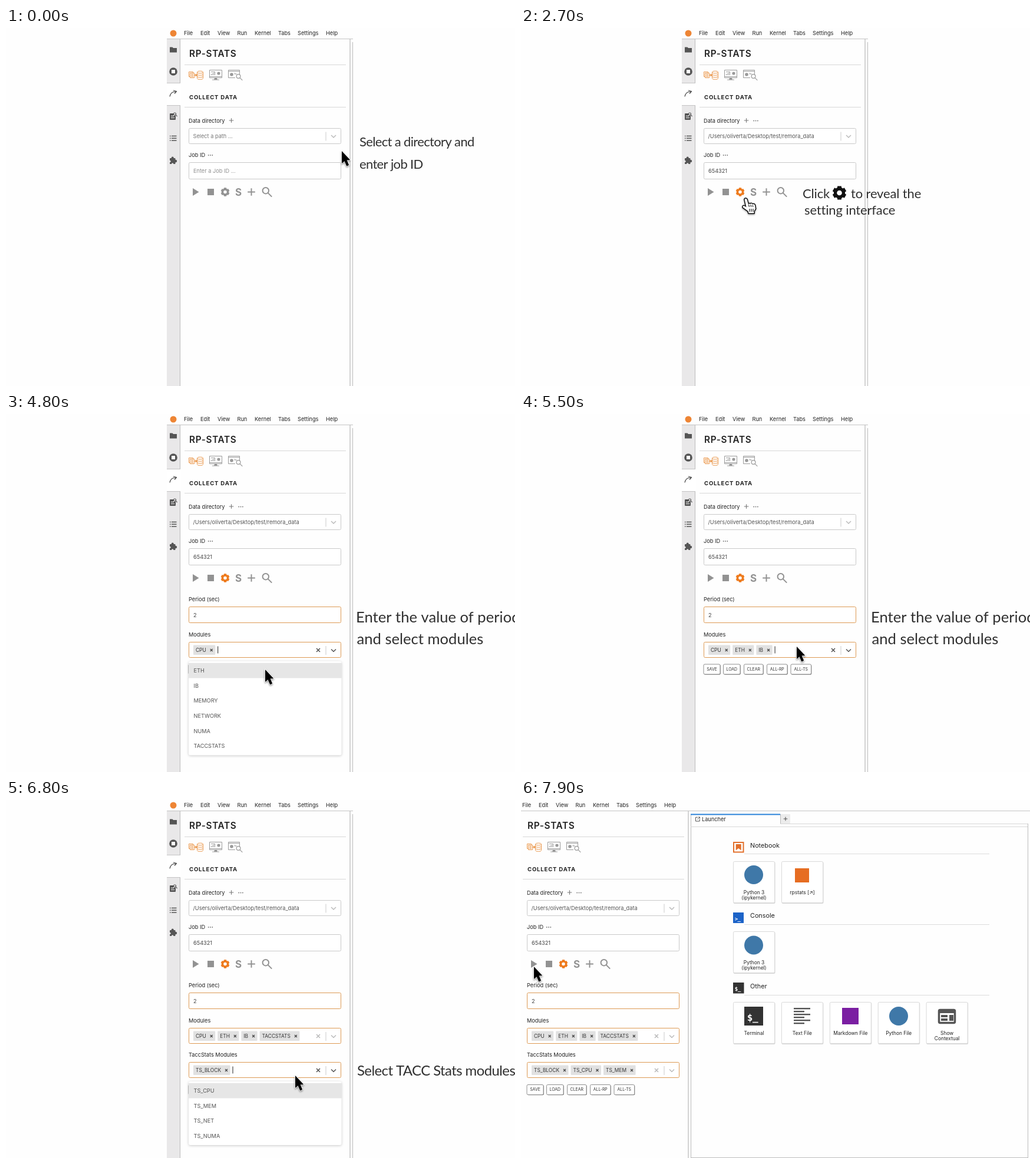
These frames come from a looping animation (864x608 px, 8000 ms). An HTML page with a canvas:

```html
<!DOCTYPE html>
<html lang="en">
<head>
<meta charset="utf-8">
<title>Collect data walkthrough</title>
<style>
html, body { margin: 0; width: 100%; height: 100%; overflow: hidden; background: #fefefe; }
canvas { display: block; width: 100vw; height: 100vh; }
</style>
</head>
<body>
<canvas id="stage" width="864" height="608"></canvas>
<script>
const ctx = document.getElementById('stage').getContext('2d');
const LOOP = 8000, CUT = 7700, STEP = 100;
const UI = 'Inter, "Liberation Sans", sans-serif';
const CAPTION = 'Lato, "Open Sans", sans-serif';
const INK = '#333', GREY = '#929292', LINE = '#c9c9c9', ORANGE = '#ee7a1c', FIELD = '#dd9a54';

// time, x, y, pointer kind from that time on
const MOVES = [
  [0, 570, 209, 'arrow'], [200, 570, 209, 'arrow'], [400, 505, 180, 'arrow'],
  [600, 490, 221, 'arrow'], [800, 497, 246, 'beam'], [900, 498, 254, 'beam'],
  [2000, 498, 254, 'beam'], [2200, 450, 270, 'arrow'], [2500, 381, 290, 'hand'],
  [2800, 381, 290, 'hand'], [3000, 412, 325, 'arrow'], [3200, 430, 343, 'beam'],
  [3700, 430, 343, 'beam'], [3800, 415, 362, 'arrow'], [3900, 415, 362, 'arrow'],
  [4200, 408, 402, 'arrow'], [4300, 408, 402, 'arrow'], [4400, 412, 434, 'arrow'],
  [4500, 412, 434, 'arrow'], [4700, 450, 402, 'arrow'], [4800, 440, 434, 'arrow'],
  [4900, 440, 434, 'arrow'], [5100, 455, 402, 'arrow'], [5200, 450, 434, 'arrow'],
  [5300, 450, 434, 'arrow'], [5500, 468, 395, 'arrow'], [5600, 468, 395, 'arrow'],
  [5700, 450, 511, 'arrow'], [5800, 450, 511, 'arrow'], [6200, 480, 462, 'arrow'],
  [6400, 470, 493, 'arrow'], [6500, 470, 493, 'arrow'], [6700, 491, 468, 'arrow'],
  [6800, 491, 468, 'arrow'], [6900, 485, 493, 'arrow'], [7000, 485, 493, 'arrow'],
  [7200, 495, 468, 'arrow'], [7300, 480, 493, 'arrow'], [7400, 480, 493, 'arrow'],
  [7900, 322, 283, 'arrow']
];

// options, picks [time, name], open spans, focus span
const MODULES = {
  y: 388, options: ['CPU', 'ETH', 'IB', 'MEMORY', 'NETWORK', 'NUMA', 'TACCSTATS'],
  picks: [[4500, 'CPU'], [4900, 'ETH'], [5300, 'IB'], [5800, 'TACCSTATS']],
  open: [[4300, 4500], [4700, 4900], [5100, 5300], [5600, 5800]], focus: [4300, 6300]
};
const TACC = {
  y: 446, options: ['BLOCK', 'CPU', 'MEM', 'NET', 'NUMA'].map(s => 'TS_' + s),
  picks: [[6500, 'TS_BLOCK'], [7000, 'TS_CPU'], [7400, 'TS_MEM']],
  open: [[6300, 6500], [6700, 7000], [7200, 7400]], focus: [6300, 7700]
};

const within = (t, [a, b]) => t >= a && t < b;

function text(s, x, y, size = 9.2, color = INK, o = {}) {
  ctx.font = `${o.weight || 400} ${size}px ${o.family || UI}`;
  ctx.letterSpacing = (o.gap || 0) + 'px';
  ctx.textAlign = o.align || 'left';
  ctx.fillStyle = color;
  ctx.fillText(s, x, y + size * 0.36);
  return ctx.measureText(s).width;
}

function rect(x, y, w, h, fill, stroke, r = 0, lw = 1) {
  ctx.beginPath();
  ctx.roundRect(x, y, w, h, r);
  if (fill) { ctx.fillStyle = fill; ctx.fill(); }
  if (stroke) { ctx.strokeStyle = stroke; ctx.lineWidth = lw; ctx.stroke(); }
}

function disc(x, y, r, fill) {
  ctx.beginPath();
  ctx.arc(x, y, r, 0, 7);
  ctx.fillStyle = fill;
  ctx.fill();
}

// SVG path drawn relative to a point
function path(d, x, y, fill, stroke, lw = 1) {
  const p = new Path2D(d);
  ctx.save();
  ctx.translate(x, y);
  ctx.lineJoin = 'round';
  if (stroke) { ctx.strokeStyle = stroke; ctx.lineWidth = lw; ctx.stroke(p); }
  if (fill) { ctx.fillStyle = fill; ctx.fill(p); }
  ctx.restore();
}

const hline = (x1, x2, y, c = '#d8d8d8') => rect(x1, y, x2 - x1, 1, c);
const vline = (x, y1, y2, c = '#bbb') => rect(x, y1, 1, y2 - y1, c);
const cross = (x, y, r, c, lw) => path(`M${-r} ${-r}L${r} ${r}M${r} ${-r}L${-r} ${r}`, x, y, null, c, lw);
const plus = (x, y, r, c, lw) => path(`M${-r} 0H${r}M0 ${-r}V${r}`, x, y, null, c, lw);

function dots(x, y) {
  for (let i = -1; i < 2; i++) disc(x + i * 3.3, y, 0.9, '#777');
}

function lens(x, y, r, c, lw) {
  ctx.beginPath();
  ctx.arc(x, y, r, 0, 7);
  ctx.moveTo(x + r * 0.7, y + r * 0.7);
  ctx.lineTo(x + r * 2, y + r * 2);
  ctx.strokeStyle = c;
  ctx.lineWidth = lw;
  ctx.stroke();
}

function gear(x, y, r, c) {
  ctx.beginPath();
  for (let i = 0; i < 6; i++) {
    const a = i * Math.PI / 3 + Math.PI / 2;
    for (const [da, k] of [[-0.38, 0.8], [-0.28, 1], [0.28, 1], [0.38, 0.8]])
      ctx.lineTo(x + Math.cos(a + da) * r * k, y + Math.sin(a + da) * r * k);
  }
  ctx.closePath();
  ctx.moveTo(x + r * 0.36, y);
  ctx.arc(x, y, r * 0.36, 0, Math.PI * 2);
  ctx.fillStyle = c;
  ctx.fill('evenodd');
}

function menuBar() {
  disc(284, 9, 5.5, '#ee8534');
  const items = [['File', 302], ['Edit', 330], ['View', 359], ['Run', 392.5], ['Kernel', 422],
    ['Tabs', 462], ['Settings', 495], ['Help', 543]];
  for (const [s, x] of items) text(s, x, 9, 9.2, '#222');
}

function sideBar() {
  rect(273, 19, 23, 589, '#e9e8e9');
  vline(295, 19, 608);
  rect(273, 94, 24, 37, '#fff');
  hline(273, 296, 93, '#c4c4c4');
  hline(273, 296, 131, '#c4c4c4');
  const c = '#555';
  path('M-6 -4.5H-1.5L0 -3H6V4.5H-6Z', 284, 37, c);
  disc(284, 74, 6.8, c);
  rect(281, 71, 6, 6, '#fff');
  path('M-6 5.5C-5 0 -1 -3 4 -3M0 -5L5.5 -3.5L2 .5', 284, 111, null, '#444', 1.2);
  rect(278, 145, 10, 11, c, null, 1);
  hline(280, 285, 149, '#fff');
  hline(280, 286, 152, '#fff');
  rect(284, 142, 6, 7, '#e9e8e9');
  lens(286.5, 146, 2, c, 1.2);
  for (let i = -1; i < 2; i++) {
    rect(278, 186.5 + i * 3.8, 1.6, 1.5, c);
    rect(281, 186.5 + i * 3.8, 8.5, 1.5, c);
  }
  rect(278, 221, 9.5, 10, c, null, 1);
  disc(282.7, 220.5, 2, c);
  disc(288, 226, 2.2, c);
  disc(278, 226.5, 1.7, '#e9e8e9');
  disc(282.7, 231, 1.7, '#e9e8e9');
}

function viewIcons() {
  const o = '#eb9a50';
  rect(310.5, 74.5, 7, 8, '#fff', o);
  rect(312.5, 76.5, 7, 8, '#fff', o);
  for (let i = 0; i < 3; i++) hline(314, 318, 78 + i * 2, o);
  path('M0 0H4M2 -2L4.5 0L2 2', 319.5, 80, null, o, 1.3);
  for (let i = 0; i < 4; i++) {
    ctx.beginPath();
    ctx.ellipse(329.5, 75 + i * 3.5, 5, 1.9, 0, 0, i ? Math.PI : 7);
    ctx.strokeStyle = o;
    ctx.lineWidth = 1;
    ctx.stroke();
  }
  path('M-5 0V10.5M5 0V10.5', 329.5, 75, null, o);

  const g = '#9a9a9a';
  rect(345.5, 71.5, 21, 13, '#fff', g);
  hline(346, 366, 82, g);
  path('M-2 0H2L3 3H-3Z', 356, 85, g);
  hline(350, 362, 87.5, g);
  for (let i = 0; i < 4; i++) vline(348 + i * 2, 80 - (i * 5 % 4) - 2, 80, g);
  hline(348, 355, 74, g);
  disc(361, 77, 2.6, g);

  rect(377.5, 71.5, 19, 13, '#fff', g);
  hline(378, 396, 73, g);
  disc(383, 79, 2.8, g);
  vline(388, 76, 79, g);
  vline(390, 77, 79, g);
  rect(389, 79, 9, 8, '#fff');
  lens(394.5, 82, 3.4, g, 1.2);
}

function box(y, h, border) {
  rect(310.5, y - 0.5, 258, h, '#fff', border, 2);
}

function chevron(y, lit) {
  vline(542.5, y + 6, y + 21, '#ccc');
  path('M-4 -2L0 2L4 -2', 556, y + 13.5, null, lit ? '#555' : '#bbb', 1.5);
}

function caret(x, y) {
  vline(x, y - 6, y + 6, '#222');
}

function tags(names, y) {
  let x = 318;
  for (const s of names) {
    ctx.font = `400 8.4px ${UI}`;
    ctx.letterSpacing = '0px';
    const w = ctx.measureText(s).width + 19.5;
    rect(x, y + 4.5, w, 16.5, '#e1e1e1', null, 1);
    text(s, x + 4, y + 12.5, 8.4, '#333');
    cross(x + w - 6.5, y + 13, 2, '#444', 1.2);
    x += w + 4;
  }
  return x;
}

function optionMenu(list, top, cursorY) {
  const row = 25.7, h = Math.min(list.length * row + 5.4, 586 - top);
  ctx.save();
  ctx.shadowColor = 'rgba(0,0,0,.22)';
  ctx.shadowBlur = 4;
  ctx.shadowOffsetY = 1;
  rect(310, top, 259.5, h, '#fff', null, 3);
  ctx.restore();
  ctx.save();
  ctx.beginPath();
  ctx.rect(310, top, 260, h);
  ctx.clip();
  const over = Math.floor((cursorY - top - 2.7) / row);
  const hot = over > 0 && over < list.length ? over : 0;
  list.forEach((s, i) => {
    const y = top + 2.7 + i * row;
    if (i === hot) rect(310, y, 260, row, '#e6e6e6');
    text(s, 318.5, y + row / 2, 9.2, '#555');
  });
  ctx.restore();
}

function multiSelect(m, t) {
  const focus = within(t, m.focus);
  const chosen = m.picks.filter(p => t >= p[0]).map(p => p[1]);
  box(m.y, 26, FIELD);
  if (chosen.length) {
    const x = tags(chosen, m.y);
    if (focus) caret(x, m.y + 12.5);
    cross(530, m.y + 13, 3, focus ? '#555' : '#bbb', 1.6);
  } else {
    text('Select...', 318, m.y + 12.5, 9.2, '#8a8a8a');
    if (focus) caret(317, m.y + 12.5);
  }
  chevron(m.y, focus);
}

function drop(m, t, cy) {
  if (!m.open.some(s => within(t, s))) return;
  const chosen = m.picks.filter(p => t >= p[0]).map(p => p[1]);
  optionMenu(m.options.filter(s => !chosen.includes(s)), m.y + 32, cy);
}

function buttons(y) {
  const list = [['SAVE', 310, 28], ['LOAD', 343.5, 28.5], ['CLEAR', 378.5, 32.5],
    ['ALL-RP', 417.5, 34.5], ['ALL-TS', 458, 34.5]];
  for (const [s, x, w] of list) {
    rect(x + 0.8, y - 7.7, w, 17, '#777', null, 2);
    rect(x, y - 8.5, w, 17, '#fff', '#8f8f8f', 2);
    text(s, x + w / 2, y, 6.9, '#333', { align: 'center' });
  }
}

function settings(t) {
  if (t < 2800) return;
  ctx.save();
  if (t < 2900) {
    ctx.beginPath();
    ctx.rect(296, 300, 288, 102);
    ctx.clip();
  }
  text('Period (sec)', 310, 315, 9.2, '#222');
  box(328, 27, FIELD);
  if (t >= 3400) text('2', 318, 341.5, 9.2, '#444');
  if (within(t, [3200, 3800])) caret(t < 3400 ? 318 : 324.5, 341.5);
  text('Modules', 310, 374.5, 9.2, '#222');
  multiSelect(MODULES, t);
  const tacc = t >= 5800;
  if (tacc) {
    text('TaccStats Modules', 310, 432.5, 9.2, '#222');
    multiSelect(TACC, t);
  }
  buttons(tacc ? 492 : 433.5);
  ctx.restore();
}

function form(t, cy) {
  text('RP-STATS', 311, 43.5, 15.3, '#222', { weight: 600, gap: 0.7 });
  hline(303, 577, 62);
  viewIcons();
  text('COLLECT DATA', 311, 117.5, 9.6, '#222', { weight: 700, gap: 0.8 });
  hline(303, 577, 134);

  const picked = t >= 700;
  text('Data directory', 310, 157.5, 9.2, '#222');
  plus(382.5, 157, 3.8, '#777', 1.1);
  if (picked) dots(398.5, 157.5);
  box(171, 26, LINE);
  const dir = '/Users/oliverta/Desktop/test/remora_data';
  text(picked ? dir : 'Select a path ...', 317.5, 183.5, 9.2, picked ? '#555' : '#777');
  chevron(170.5, within(t, [400, 700]));

  text('Job ID', 310, 216, 9.2, '#222');
  dots(347, 216);
  const focus = within(t, [800, 2100]);
  box(229, 28, focus ? '#5a96da' : LINE);
  const typed = '654321'.slice(0, Math.max(0, Math.floor((t - 1000) / 120)));
  const w = typed ? text(typed, 318, 242.5, 9.2, '#444') : 0;
  if (!typed) text('Enter a Job ID ...', 318, 242.5, 9.2, '#8f8f8f');
  if (focus) caret(318 + w, 242.5);

  path('M-5 -6.5L5.5 0L-5 6.5Z', 322, 278.5, GREY);
  rect(342, 273, 11, 11, GREY);
  gear(372, 278.5, 7.6, t >= 2500 ? ORANGE : GREY);
  text('S', 394.5, 278.5, 17, GREY, { weight: 700, align: 'center' });
  plus(416.5, 278.5, 6.3, GREY, 2);
  lens(440.8, 276.2, 5.2, GREY, 2);

  settings(t);
  if (within(t, [400, 700])) optionMenu([dir], 203, cy);
  drop(MODULES, t, cy);
  drop(TACC, t, cy);
}

function card(x, y, lines) {
  rect(x + 0.5, y + 1, 71, 71, '#d6d6d6', null, 2);
  rect(x + 0.5, y + 0.5, 70, 70, '#fff', '#dadada', 2);
  lines.forEach((s, i) => text(s, x + 35.5, y + 53 + i * 9.3, 8.4, '#222', { align: 'center' }));
}

function prompt(x, y, size, fill, s) {
  rect(x, y, size, size, fill);
  text(s, x + size * 0.15, y + size * 0.57, size * 0.5, '#fff', { weight: 700, family: '"DejaVu Sans Mono", monospace', gap: -0.5 });
}

function launcher() {
  vline(288, 24, 608);
  rect(288, 23.5, 152, 2, '#2b83da');
  vline(440, 24, 41);
  rect(441, 24, 16, 16, '#ececec');
  hline(440, 861, 40);
  hline(288, 861, 45);
  vline(860, 40, 608);
  hline(288, 861, 607, '#bbb');
  path('M0 -3.2H-3.5V3.5H3.2V0M1 -3.5H3.5V-1M3.5 -3.5L-.5 .5', 300, 32.5, null, '#555', 1);
  text('Launcher', 307, 32.5, 9.2, '#222');
  plus(449, 32, 3.3, '#555', 1.1);

  ['Notebook', 'Console', 'Other'].forEach((s, i) => {
    text(s, 389, 77 + i * 119.5, 10.8, '#222');
    hline(379, 795, 91 + i * 120, '#dcdcdc');
  });
  rect(361, 72, 16.5, 16.5, '#fff', '#e2702c', 0, 2);
  path('M-4.5 -5H4.5V5.5L0 2L-4.5 5.5Z', 369.2, 80, '#e2702c');
  prompt(360, 191, 18, '#1c63c8', '>_');
  prompt(360, 310, 18.5, '#333', '$_');

  const py = ['Python 3', '(ipykernel)'], blue = '#3f78a8';
  card(360, 104, py);
  disc(395, 127, 16, blue);
  card(442, 104, ['rpstats [↗]']);
  rect(465, 116, 24, 24, '#e66d22');
  card(360, 223, py);
  disc(395, 246.5, 16, blue);
  [['Terminal'], ['Text File'], ['Markdown File'], ['Python File'], ['Show', 'Contextual']]
    .forEach((s, i) => card(360 + i * 81.9, 343, s));
  prompt(379, 351, 32, '#333', '$_');
  for (let i = 0; i < 6; i++) rect(463, 353 + i * 5, i % 2 ? 18 : 28, 2.4, '#555');
  rect(545, 353, 28, 28, '#7b1fa2');
  disc(641, 367, 16, blue);
  rect(709.5, 356.5, 27, 22, '#fff', '#555', 2, 3.5);
  rect(709, 356, 28, 6, '#555');
  rect(713, 365, 11, 4, '#555');
  rect(713, 371, 11, 4, '#555');
  rect(727, 365, 7, 10, '#555');
}

function caption(t) {
  const put = (s, x, y, size, gap = 0) => text(s, x, y, size, '#303030', { family: CAPTION, gap });
  if (t < 2000) {
    put('Select a directory and', 600, 193, 22, -0.65);
    put('enter job ID', 600, 231, 22, -0.65);
  } else if (within(t, [2300, 3800])) {
    put('Click', 478, 281, 22, -0.15);
    gear(540.5, 280, 12, '#111');
    put('to reveal the', 560, 281, 22, -0.15);
    put('setting interface', 481, 309.5, 22, -0.15);
  } else if (within(t, [4000, 5700])) {
    put('Enter the value of period', 594, 345, 25.6);
    put('and select modules', 595.5, 382, 25.6);
  } else if (within(t, [6000, CUT])) {
    put('Select TACC Stats modules', 596, 459, 24, -0.6);
  }
}

function pointerAt(t) {
  let i = MOVES.length - 1;
  while (MOVES[i][0] > t) i--;
  const [t0, x, y, kind] = MOVES[i], next = MOVES[i + 1];
  if (!next) return { x, y, kind };
  const k = (t - t0) / (next[0] - t0), e = k * k * (3 - 2 * k);
  return { x: x + (next[1] - x) * e, y: y + (next[2] - y) * e, kind };
}

function pointer({ x, y, kind }) {
  if (kind === 'beam') {
    const d = 'M-5 -12Q0 -12 0 -8V8Q0 12 -5 12M5 -12Q0 -12 0 -8M0 8Q0 12 5 12M-3 2H3';
    path(d, x, y, null, '#fff', 3.2);
    path(d, x, y, null, '#111', 1.7);
    return;
  }
  ctx.save();
  ctx.shadowColor = 'rgba(0,0,0,.3)';
  ctx.shadowBlur = 3;
  ctx.shadowOffsetY = 1.5;
  if (kind === 'hand')
    path('M-1.5 1Q0 -2 2.5 1L5 10Q6 7 8.5 9Q10 7 12 9.5Q15 8 16 11L17 17L14.5 21V24.5H5.5L4.5 21L-4.5 14.5Q-5 11 -1 12.5L1.5 14.5Z', x, y, '#fff', '#111', 3);
  else
    path('M0 0V21L4.6 16.9L8.3 25.4L12.1 23.8L8.5 15.3H14.3Z', x, y, '#000', '#fff', 2.2);
  ctx.restore();
  if (kind === 'hand')
    path('M5.5 10L6.5 14M9 10L9.7 14M12.2 10.5L12.8 14M7 17V22M10 17V22M13 17V22', x, y, null, '#111', 1.1);
}

function draw(t) {
  const p = pointerAt(t), wide = t >= CUT;
  rect(0, 0, 864, 608, '#fefefe');
  hline(wide ? 0 : 273, wide ? 864 : 589, 18, '#c4c4c4');
  ctx.save();
  if (wide) ctx.translate(-300, 0);
  menuBar();
  sideBar();
  vline(583.5, 19, 608, '#aaa');
  if (!wide) vline(588, 24, 608);
  form(t, p.y);
  ctx.restore();
  if (wide) launcher();
  caption(t);
  ctx.save();
  if (wide) ctx.translate(-300, 0);
  pointer(p);
  ctx.restore();
}

const start = performance.now();
function tick() {
  const t = (performance.now() - start) % LOOP;
  draw(Math.floor(t / STEP) * STEP);
  requestAnimationFrame(tick);
}
tick();
</script>
</body>
</html>
```
